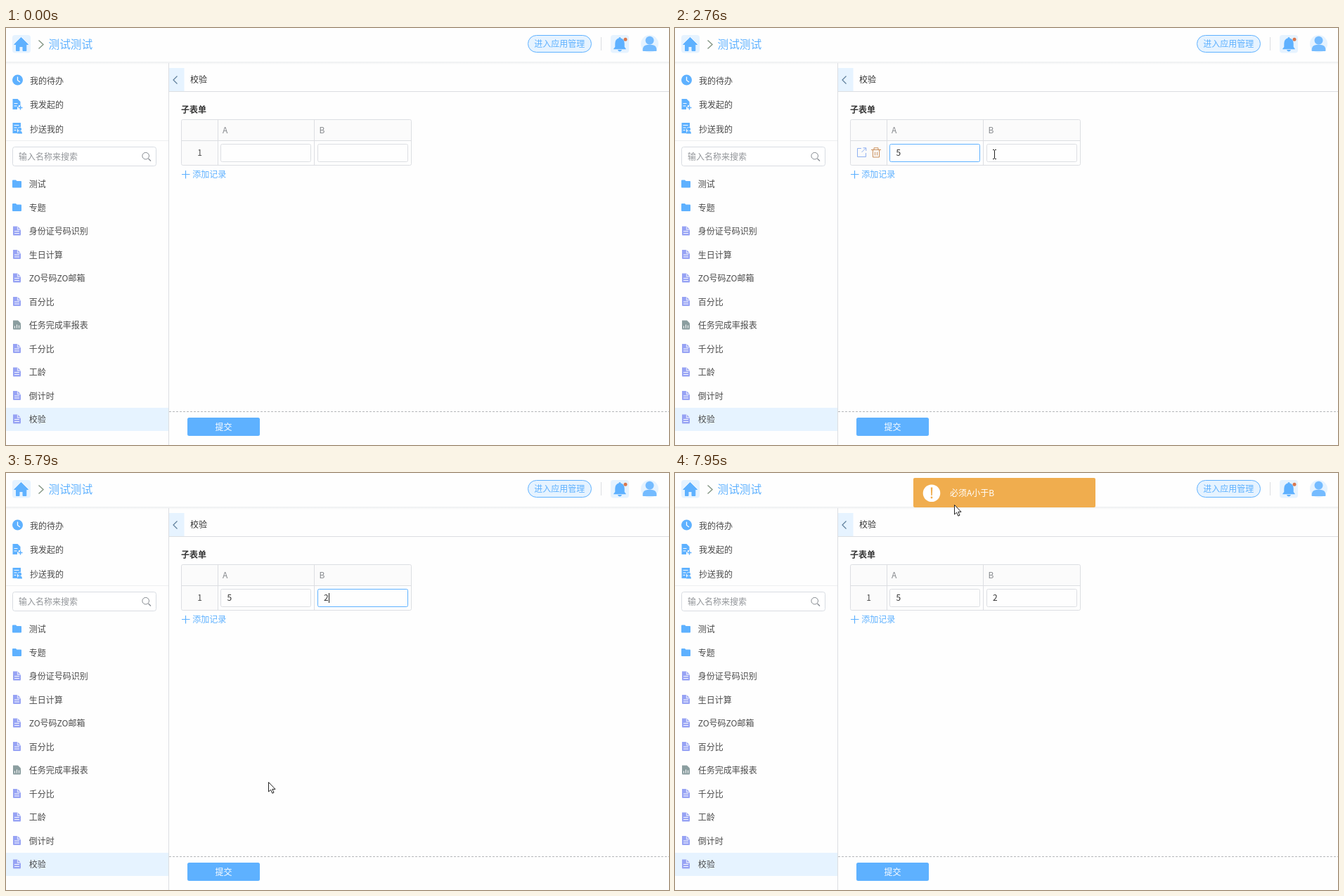
Animation of 943 by 594 pixels, one loop 8 s. Source, as an HTML page:

```html
<!DOCTYPE html>
<html lang="zh-CN">
<head>
<meta charset="utf-8">
<title>校验</title>
<style>
  html, body { margin: 0; width: 100%; height: 100%; overflow: hidden; background: #fefefe; }
  svg { display: block; width: 943px; height: 594px; }
  text { font: 12px "Noto Sans CJK SC", "Noto Sans CJK", "Noto Sans", sans-serif; fill: #4a4a4a; white-space: pre; }
  .blue { fill: #5eb1ff; }
  .pale { fill: #e6f3ff; }
  .line { fill: none; stroke: #dcdee2; }
  .white { fill: #fff; }
  .grey { fill: #8a8d92; }
  .wl { fill: none; stroke: #fff; stroke-width: 1.3; }
</style>
</head>
<body>
<svg viewBox="0 0 943 594">
  <defs>
    <linearGradient id="shade" x2="0" y2="1">
      <stop stop-color="#eceef0"/><stop offset="1" stop-color="#fefefe"/>
    </linearGradient>
    <g id="folder"><path class="blue" d="M9 217.500q0-1 1-1h4l1.500 1.500H21q1 0 1 1v7.500q0 1-1 1H10q-1 0-1-1z"/></g>
    <g id="doc">
      <path fill="#97a3f4" d="M10 215.500h6.500l4.500 4.500V227.500q0 1-1 1h-9q-1 0-1-1z"/>
      <path class="wl" d="M16.500 215.500v4.500H21" stroke-width=".6" opacity=".7"/>
      <path class="wl" d="M12 222.500h7M12 225.500h7" style="stroke-width:1"/>
    </g>
    <g id="report">
      <path fill="#8b9ea0" d="M10 215.500h7l4 4V227.500q0 1-1 1h-9q-1 0-1-1z"/>
      <path class="wl" d="M12.500 226.500v-3M15.500 226.500v-5M18.500 226.500v-4" style="stroke-width:1"/>
    </g>
  </defs>
  <rect width="943" height="594" fill="#fefefe"/>

  <!-- top bar -->
  <rect y="48" width="943" height="4" fill="url(#shade)"/>
  <rect class="pale" x="9" y="10" width="26" height="25.500" rx="4"/>
  <path class="blue" d="M21.500 13.500 31.500 23.500H28.800V32.500H24V26.500H19V32.500H14.500V23.500H11.700z" stroke="#5eb1ff" stroke-linejoin="round"/>
  <path d="M46.500 17.500 53 23.500 46.500 29.500" fill="none" stroke="#849684" stroke-width="1.400"/>
  <text x="60.500" y="28.500" style="font-size:15.700px;fill:#5eb1ff">测试测试</text>
  <rect class="pale" x="742.500" y="10.500" width="90" height="24" rx="12" stroke="#5eb1ff"/>
  <text x="751.200" y="27" style="fill:#5eb1ff">进入应用管理</text>
  <path class="line" d="M846.500 13v19"/>
  <rect class="pale" x="860" y="10" width="26" height="25.500" rx="4"/>
  <path class="blue" d="M873 13q1.500 0 1.500 1.500 5.200 1.600 5.200 7.500v5l2 2.500v.8H864.300v-.8l2-2.500v-5q0-5.900 5.200-7.500 0-1.500 1.500-1.500zM870 31h6q-1 2.500-3 2.500t-3-2.500z"/>
  <circle cx="881" cy="16.200" r="2.500" fill="#d9784f"/>
  <circle class="pale" cx="915.500" cy="22.500" r="12.500"/>
  <g fill="#74bbff"><circle cx="915.500" cy="17.800" r="6"/><path d="M905.500 32q0-7.500 6.500-8h7q6.500.500 6.500 8 0 1-1 1h-18q-1 0-1-1z"/></g>

  <!-- sidebar -->
  <path class="line" d="M231.500 50V594"/>
  <path d="M0 160.500H231" stroke="#eeeff1"/>
  <circle class="blue" cx="16.500" cy="74" r="7.500"/>
  <path class="wl" d="M16.500 69.500V74.500L20 77"/>
  <path class="blue" d="M9.500 101h7l4 4v5h-2.500v2.500h-2v3.500H9.500z"/>
  <path class="wl" d="M11.500 107.500h5M11.500 111h4" style="stroke-width:1"/>
  <path d="M20.500 110.500v6M17.500 113.500h6" stroke="#5eb1ff" stroke-width="1.500"/>
  <path class="blue" d="M9.500 135h11.500v6h-3l-2 4v5H9.500z"/>
  <path class="wl" d="M11.500 138.500h7M11.500 142h4M11.500 145.500h3" style="stroke-width:1"/>
  <g class="blue"><circle cx="19.500" cy="144" r="2.500"/><path d="M16 150.500q0-4 3.500-4t3.500 4z"/></g>
  <text x="34" y="80">我的待办</text>
  <text x="34" y="114.300">我发起的</text>
  <text x="34" y="148.500">抄送我的</text>
  <rect x="9.500" y="169.500" width="204" height="27" rx="3" fill="#fff" stroke="#d8dce2"/>
  <text x="18" y="187.500" style="fill:#929599">输入名称来搜索</text>
  <path d="M202.500 186 206 189.500" stroke="#858a90" stroke-width="1.200"/>
  <circle cx="198.700" cy="182.200" r="4.800" fill="none" stroke="#858a90"/>
  <rect class="pale" y="541" width="231" height="33"/>
  <g id="menu"></g>

  <!-- form -->
  <rect class="pale" x="232" y="57" width="21.500" height="33"/>
  <path d="M243.500 68.500 238 74 243.500 79.500" fill="none" stroke="#5f7f9c" stroke-width="1.200"/>
  <text x="262" y="78.300" style="fill:#333">校验</text>
  <path class="line" d="M232 90.500H943"/>
  <text x="249" y="121.200" style="font-weight:700;fill:#333">子表单</text>
  <rect x="249.500" y="130.500" width="327" height="65" rx="2" fill="#fefefe"/>
  <path d="M250 131H576V160H301V195H250z" fill="#fbfbfb"/>
  <path class="line" d="M249.500 160.500H576.500M301.500 130.500V195.500M438.500 130.500V195.500"/>
  <rect class="line" x="249.500" y="130.500" width="327" height="65" rx="2"/>
  <text x="308" y="150" style="fill:#85888c">A</text>
  <text x="445.500" y="150" style="fill:#85888c">B</text>
  <rect id="boxA" x="305.500" y="165.500" width="128" height="25" rx="2" fill="#fefefe"/>
  <rect id="boxB" x="443.500" y="165.500" width="128" height="25" rx="2" fill="#fefefe"/>
  <text id="valA" x="314.500" y="182.300" style="fill:#333">5</text>
  <text id="valB" x="452" y="182.300" style="fill:#333">2</text>
  <path id="caret" d="M0 171V185" stroke="#222"/>
  <text id="rowNo" x="275.500" y="182.300" text-anchor="middle">1</text>
  <g id="tools" fill="none">
    <path d="M265 171.500H259.500V183.500H271.500V178M267.500 170.800H271.800V175M271.500 171 265.500 177" stroke="#8fb0f0"/>
    <path d="M279 173.500H293M283 173V170.800H289V173M281.500 174V184H290.500V174M284.500 176.500V181.500M287.500 176.500V181.500" stroke="#c98d58"/>
  </g>
  <path d="M250 208.500H261.500M255.500 203V214.500" stroke="#5eb1ff" stroke-width="1.200"/>
  <text x="265.300" y="213.300" style="fill:#5eb1ff">添加记录</text>
  <path d="M232 546.500H943" stroke="#b5b7ba" stroke-dasharray="3 2"/>
  <rect id="submit" x="258" y="555" width="103" height="26" rx="2.500"/>
  <text x="309.500" y="573.200" text-anchor="middle" style="fill:#fff">提交</text>

  <!-- toast -->
  <g id="toast">
    <rect x="339" y="7" width="259" height="42" rx="2" fill="#f0ad4e"/>
    <circle class="white" cx="365" cy="28.700" r="12.300"/>
    <path d="M363.800 20.500h2.500l-.5 11.500h-1.500z" fill="#f0ad4e"/>
    <circle cx="365" cy="35" r="1.400" fill="#f0ad4e"/>
    <text x="391" y="33" style="fill:#fff">必须A小于B</text>
  </g>

  <!-- pointers, hotspot at the origin -->
  <g id="arrow"><path d="M.5.500V14L3.600 11.200 5.800 16.200 8 15.200 5.800 10.400H10z" fill="#fff" stroke="#222"/></g>
  <g id="beam"><path d="M-2-6.500H0M1-6.500H3M.5-6V6M-2 6.500H0M1 6.500H3" fill="none" stroke="#222"/></g>
  <g id="hand"><path d="M-1.200 1Q-1.200-.500 0-.500T1.300 1V6.500Q3.500 5.500 4 7.300 6 6.300 6.700 8 9 7.300 9.300 9.500V13Q9 15.500 7.800 17.500H.3Q-.500 15-3.800 11.500-4.800 9.500-3.500 9.200T-1.200 11zM4 7.300V10M6.700 8V10.500M1.300 6.500V9.500" fill="#fff" stroke="#222" stroke-linejoin="round"/></g>
</svg>
<script>
const LOOP = 8000, STEP = 80;
const BLINK_ON = 560, BLINK = 1040;
const $ = id => document.getElementById(id);
const show = (id, on) => $(id).setAttribute('visibility', on ? 'visible' : 'hidden');
const clamp = x => Math.max(0, Math.min(1, x));
const ramp = (t, a, b) => clamp((t - a) / (b - a));
const ease = x => x * x * (3 - 2 * x);

const items = ['测试', '专题', '身份证号码识别', '生日计算', 'ZO号码ZO邮箱', '百分比',
  '任务完成率报表', '千分比', '工龄', '倒计时', '校验'];
$('menu').innerHTML = items.map((name, i) => {
  const icon = i < 2 ? 'folder' : i === 6 ? 'report' : 'doc';
  return `<g transform="translate(0 ${i * 33.5})"><use href="#${icon}"/><text x="32.700" y="227">${name}</text></g>`;
}).join('');

// start, end, from, to
const moves = [
  [70, 870, [560, 562], [384, 186]],
  [2360, 2920, [384, 186], [471, 179]],
  [5150, 6190, [471, 179], [325, 569]],
  [6910, 7950, [325, 569], [397, 45]]
];

// The screen recorder only sees the pointer every STEP ms.
function pointer(t) {
  let pos = moves[0][2];
  for (const [start, end, from, to] of moves) {
    if (t < start) break;
    const held = start + Math.floor((t - start) / STEP) * STEP;
    const k = ease(ramp(held, start, end));
    pos = from.map((v, i) => v + (to[i] - v) * k);
  }
  return pos;
}

const inside = ([x, y], l, t, r, b) => x >= l && x <= r && y >= t && y <= b;
const mix = (a, b, k) => `rgb(${a.map((v, i) => Math.round(v + (b[i] - v) * k))})`;
const border = k => mix([220, 222, 226], [94, 177, 255], k);

// Each click or key press restarts the blink: time, caret x.
const carets = [[930, 314.5], [1800, 322.5], [3160, 452.5], [4430, 459.5]];
function caret(t) {
  const last = carets.filter(c => t >= c[0]).pop();
  if (!last || t >= 6350) return null;
  return (t - last[0]) % BLINK < BLINK_ON ? last[1] : null;
}

function draw(t) {
  const p = pointer(t), live = t >= 70;
  const overRow = live && inside(p, 249, 161, 577, 195);
  const overField = inside(p, 305, 165, 434, 191) || inside(p, 443, 165, 572, 191);
  const overButton = live && inside(p, 258, 555, 361, 581);
  const kind = overButton ? 'hand' : overField ? 'beam' : 'arrow';

  for (const id of ['arrow', 'beam', 'hand']) {
    show(id, live && id === kind);
    $(id).setAttribute('transform', `translate(${p.map(Math.round)})`);
  }
  show('tools', overRow);
  show('rowNo', !overRow);
  $('submit').setAttribute('fill', overButton ? '#7dc1ff' : '#5eb1ff');

  show('valA', t >= 1800);
  show('valB', t >= 4430);
  $('boxA').setAttribute('stroke', border(ramp(t, 930, 1110) - ramp(t, 3150, 3320)));
  $('boxB').setAttribute('stroke', border(ramp(t, 3150, 3320) - ramp(t, 6330, 6460)));
  const x = caret(t);
  show('caret', x !== null);
  if (x !== null) $('caret').setAttribute('transform', `translate(${x} 0)`);

  $('toast').setAttribute('opacity', ramp(t, 6450, 6750));
}

const begin = performance.now();
function frame() {
  draw((performance.now() - begin) % LOOP);
  requestAnimationFrame(frame);
}
frame();
</script>
</body>
</html>
```
